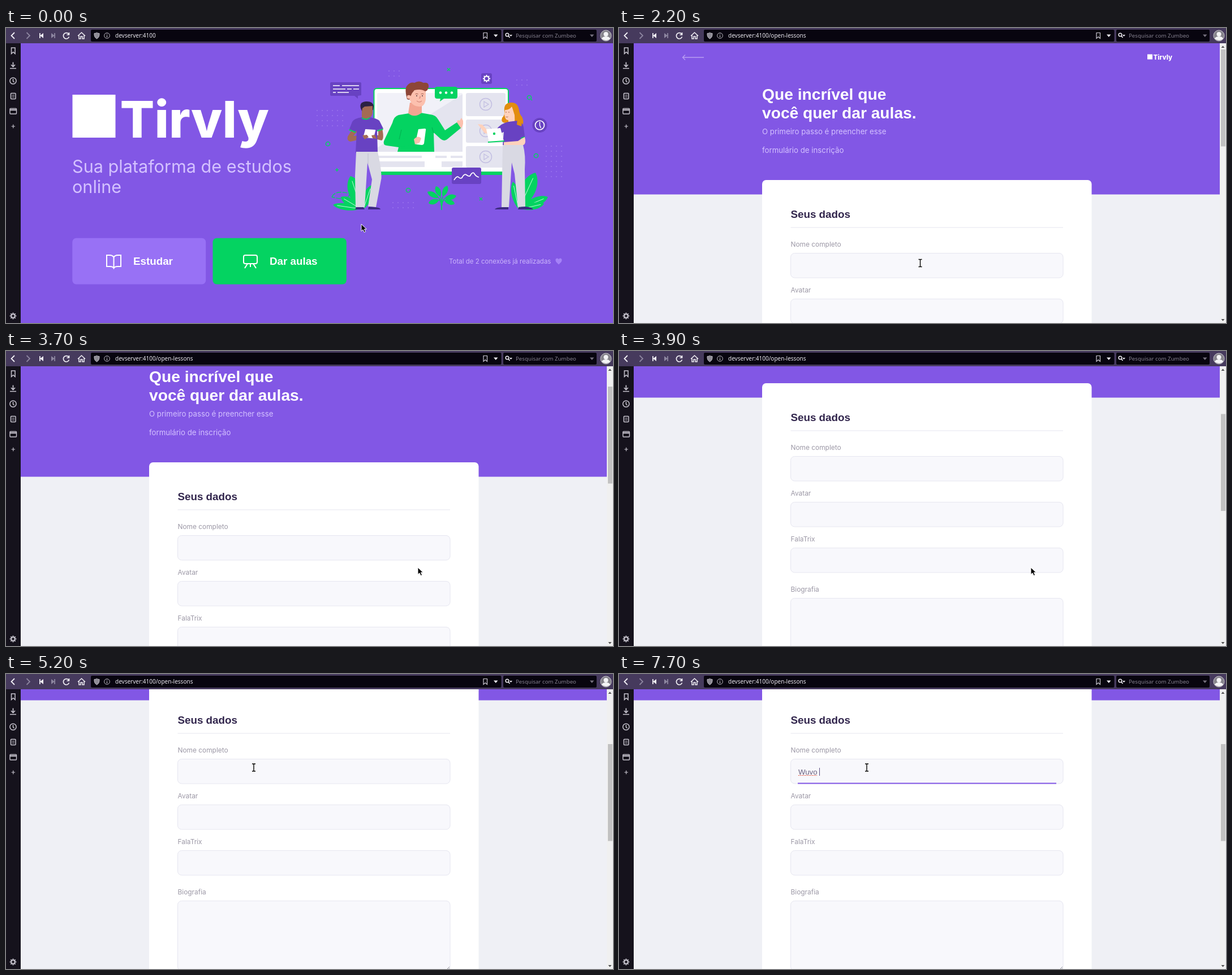
Recreate the animation shown at these times as an HTML page with a canvas. Size 1073x522 px, loop 8000 ms.

```html
<!DOCTYPE html>
<html lang="pt">
<head>
<meta charset="utf-8">
<title>Plataforma de estudos</title>
<style>
html, body { margin: 0; width: 100%; height: 100%; overflow: hidden; background: #8257e5; }
canvas { display: block; }
</style>
</head>
<body>
<canvas id="stage" width="1073" height="522"></canvas>
<script>
const g = document.getElementById('stage').getContext('2d');
const LOOP = 8000;
const PURPLE = '#8257e5', DEEP = '#6842c2', GREEN = '#04d361', LILAC = '#d4c2ff', PALE = '#e6e6f0';
const BRAND = 'Tirvly', ADDRESS = 'devserver:4100', ROUTE = '/open-lessons';
const SANS = 'Inter, sans-serif', HEAD = '"Liberation Sans", Arial, sans-serif', UI = '"Noto Sans", sans-serif';

const clamp = v => Math.max(0, Math.min(1, v));
const mix = (a, b, p) => a + (b - a) * p;
const smooth = p => p * p * (3 - 2 * p);

function paint(shape, fill, stroke, width = 1) {
  if (fill) { g.fillStyle = fill; g.fill(shape); }
  if (stroke) { g.strokeStyle = stroke; g.lineWidth = width; g.stroke(shape); }
}
function path(d, fill, stroke, width) { paint(new Path2D(d), fill, stroke, width); }
function line(d, color, width = 1.5) { path(d, null, color, width); }
function box(x, y, w, h, fill, r = 0, stroke, width) {
  const p = new Path2D();
  p.roundRect(x, y, w, h, r);
  paint(p, fill, stroke, width);
}
function circle(x, y, r, fill, stroke, width) {
  const p = new Path2D();
  p.arc(x, y, r, 0, Math.PI * 2);
  paint(p, fill, stroke, width);
}
function text(s, x, y, font, color) {
  g.font = font;
  g.fillStyle = color;
  g.fillText(s, x, y);
}
function dots(x, y, cols, rows, step) {
  for (let i = 0; i < cols * rows; i++)
    circle(x + i % cols * step, y + Math.floor(i / cols) * step, 0.8, '#a98bf2');
}
function leaf(x0, y0, x1, y1, w, vein = true) {
  const len = Math.hypot(x1 - x0, y1 - y0);
  g.save();
  g.translate(x0, y0);
  g.rotate(Math.atan2(y1 - y0, x1 - x0));
  path(`M0 0 C${len * .3} ${-w} ${len * .8} ${-w} ${len} 0 C${len * .8} ${w} ${len * .3} ${w} 0 0`, GREEN);
  if (vein) line(`M0 0H${len * .85}`, '#d9ffe8', 0.8);
  g.restore();
}
function gear(x, y, r, color, width) {
  for (let i = 0; i < 8; i++) {
    const a = i * Math.PI / 4, cx = Math.cos(a), cy = Math.sin(a);
    line(`M${x + cx * r} ${y + cy * r}L${x + cx * (r + 2)} ${y + cy * (r + 2)}`, color, width);
  }
  circle(x, y, r - 0.6, null, color, width);
}
function logo(x, y, side, size, gap) {
  box(x, y - side, side, side, '#fff');
  text(BRAND, x + side + gap, y, `800 ${size}px ${SANS}`, '#fff');
}

// Browser frame

function chrome(route) {
  box(0, 0, 1073, 27, '#463a5d');
  box(0, 27, 26, 495, '#15121c');
  const on = '#f1eff5', off = '#8d86a0';
  line('M15 8L9.5 13.5L15 19', on, 1.8);
  line('M36.5 8L42 13.5L36.5 19', off, 1.8);
  path('M59 9h1.8v4l5.2-4v9l-5.2-4v4h-1.8z', on);
  path('M87 9h-1.8v4l-5.2-4v9l5.2-4v4h1.8z', off);
  line('M111 11A5.2 5.2 0 1 0 111.5 15.5M111.5 8v4h-4', on, 1.7);
  line('M127 14L133.5 8L140 14M129 13v6h3v-4h3v4h3v-6', on, 1.5);

  box(150, 3, 725.5, 21, '#08050f', 2);
  path('M156 9.5q4 0 4.5-1.5q.5 1.5 4.5 1.5q.5 7-4.5 9.5q-5-2.5-4.5-9.5z', '#8e8b95', '#c2bfc8');
  circle(178.5, 13.5, 4.8, null, '#c5c2cb', 1);
  line('M178.5 13v3.5M178.5 10.5v1.2', '#c5c2cb', 1.2);
  text(ADDRESS + route, 193, 17.3, `10px ${UI}`, '#e9e7ee');
  line('M844 8.5h6.5v10l-3.25-3l-3.25 3z', '#cfccd5', 1.2);
  path('M862 11.5h7.5l-3.75 4.5z', on);

  box(879, 3, 165, 21, '#08050f', 2);
  circle(886, 12, 2.8, null, on, 1.5);
  line('M888 14l2.5 3', on, 1.7);
  path('M890 12h5l-2.5 3z', on);
  text('Pesquisar com Zumbeo', 901, 17.3, `9.7px ${UI}`, '#85818f');
  path('M1032 11.5h7.5l-3.75 4.5z', '#77717f');
  circle(1060.5, 13.5, 9.5, '#85838b', '#c9c6ce', 1);
  circle(1060.5, 11, 4, '#f4f4f6');
  path('M1053 19q1-4 7.5-4t7.5 4q-7 6-15 0z', '#f4f4f6');

  const ink = '#c9c6d0';
  line('M9.5 35h6.5v10.5l-3.25-3l-3.25 3z', ink);
  line('M12.5 60.5v7M9 65l3.5 3.5l3.5-3.5M7 71.5h11', ink, 1.7);
  circle(12.5, 93.5, 5.6, null, ink, 1.5);
  line('M12.5 90v4l2 2', ink);
  box(8.5, 115.5, 8.5, 10, null, 1, ink, 1.5);
  line('M10.5 119h4.5M10.5 122h4.5', ink, 1.2);
  box(7, 142.5, 11.5, 9.5, null, 1, ink, 1.4);
  line('M7 145h11', ink, 2);
  line('M9.5 174h6.5M12.75 170.7v6.6', ink, 1.2);
  gear(12.5, 509.5, 3.8, ink, 2);
}

// Home page

function board() {
  box(649.5, 106, 239.5, 154, GREEN, 6);
  box(651.5, 108, 235.5, 146, '#fff', 4);
  box(656, 115, 151, 104, '#f1f1f8', 2);
  path('M807 117V219H656V212z', '#e4e4ef');
  for (const [x, y, w, h] of [[656, 226, 79, 4], [759, 226, 20, 4], [786, 226, 21, 4], [656, 236, 84, 10], [770, 236, 37, 10]])
    box(x, y, w, h, '#e4e4ef');
  for (const [y, cy] of [[115, 135], [162, 182], [209, 228]]) {
    box(813, y, 70, y === 209 ? 38 : 41, '#e4e4ef', 3);
    circle(848, cy, 10.5, null, '#c3bfe2', 1.5);
    path(`M845 ${cy - 5}l8 5l-8 5z`, null, '#c3bfe2', 1.3);
  }
}
function teacher() {
  const skin = '#fcc0ae';
  path('M797 169Q797 161 802 164L805 159L808 164Q809 174 803 179z', skin);
  path('M712 151L694 154Q686 156 683 168L668 200Q666 207 673 208L694 211L692 219H757L756 185L768 196Q775 202 781 196L804 177L797 167L776 181L764 162Q760 154 750 153L733 150z', GREEN);
  path('M694 211L726 205L724 193L695 196z', GREEN);
  line('M699 180L695 197M756 186L753 176', '#03b653', 1.2);
  path('M714 132L735 132V150Q722 160 711 151z', '#f2a592');
  path('M711 113Q712 105 728 105L742 109V126Q740 140 730 139Q716 138 713 124z', skin);
  path('M709 126Q704 107 709 102Q715 95 722 97Q730 92 738 97Q748 95 747 104Q746 111 741 112Q734 107 722 110Q717 115 715 121L713 127z', '#8d4637');
  circle(712, 122, 3.3, skin);
  for (const x of [726, 736]) {
    circle(x, 120, 0.9, '#3a2530');
    line(`M${x - 2.5} 117q2.500-1.500 5 0`, '#8d4637', 0.8);
  }
  line('M732 120v4h-2M726 129q5 4 9 0', '#c9756a', 1);
  path('M729 179L740 178Q743 178 742 181L739 204Q738 207 735 207L726 206Q723 205 724 202z', '#fff');
  path('M721 197Q728 189 734 195L731 203L723 206z', skin);
}
function student() {
  const skin = '#a46b54';
  path('M627 142Q624 131 636 130Q648 129 650 138L649 145L630 149z', '#2b2144');
  path('M630 142L634 139L648 138V150Q646 160 639 159L643 163H629V148z', skin);
  path('M613 178L604 192Q602 200 609 201L635 195L632 189L614 191L622 182zM658 181L665 178Q669 196 664 199L648 195V188L658 190z', skin);
  path('M629 158Q615 160 612 166L607 179L618 184L620 181L618 221H657L656 181L667 178L660 164Q656 160 643 158Q638 164 629 158z', DEEP);
  line('M606.5 180L618 184.5M656 182L666.5 179M629 159q7 5 14 0', GREEN, 2);
  path('M635 180Q634 179 636 179L652 180Q654 180 653 182L650 194Q649 196 647 195L633 194Q631 194 632 191z', '#fff');
  path('M630 190L638 189L641 193L634 197zM646 190L652 189L655 196L648 195z', skin);
  path('M619 219H657Q664 250 663.5 266L654 317L640 316L647 268L639 238L634 317H618L617 262z', '#d9d9e3');
  line('M640 222V241', '#bebed0', 1);
  path('M619 317H632L634 321H617zM641 316L653 317Q662 318 662 321H640z', '#3d2a82');
}
function reader() {
  const skin = '#ffd2bc', hair = '#e28d10';
  path('M881 148Q879 132 893 132Q905 131 907 146Q908 153 912 157Q918 170 909 176L897 172L884 168Q874 168 877 159Q882 154 881 148z', hair);
  path('M882 145Q890 145 894 139L900 148L899 168L888 169V163Q882 163 881 153z', skin);
  path('M894 138Q904 139 905 151Q914 164 908 172Q899 168 899 154z', hair);
  line('M883 149h2M888 149h2M883.5 157q2 1.500 4 0', '#a05a45', 0.9);
  path('M868 178L850 180L842 171L834 170L846 186L866 190L873 186z', skin);
  path('M888 166L904 164Q914 167 915 176L917 192L910 196V208H878L880 184L872 187L866 180Q876 168 888 166z', DEEP);
  path('M904 160Q914 164 911 174L903 171z', hair);
  line('M910 195.5L917 192.5M866 180L872 186.5', GREEN, 1.5);
  path('M911 196L917 193Q920 204 915 207L880 208V202L905 200z', skin);
  path('M849 179L874 177L880 200L854 203z', '#fff');
  line('M852 202L881 200', GREEN, 1.8);
  circle(863, 187, 2.2, GREEN);
  path('M878 207H914Q919 225 917 250L918 316L905 317L899 258L894 238L889 317H876L877 260z', '#d9d9e3');
  path('M880 317H888V321H864Q866 317 880 317zM906 317L918 316Q930 317 932 321H905z', '#3d2a82');
}
function ornaments() {
  for (const d of [[677, 76, 3, 2, 9], [550, 146, 6, 4, 9], [903, 92, 3, 2, 9], [955, 209, 4, 7, 9], [684, 309, 5, 2, 9]]) dots(...d);
  for (const [x, y] of [[569, 205], [925, 123], [937, 226], [711, 287]]) circle(x, y, 3.6, null, GREEN, 1.5);
  line('M780 71l5 5m0-5l-5 5M837 300l5 5m0-5l-5 5M582 251h6m-3-3v6M928 126l2 2', GREEN);
  path('M575 96H626Q628 96 628 98V119L622 120V125L616 120H575Q573 120 573 118V98Q573 96 575 96z', DEEP);
  line('M578 102h12m4 0h30M578 108h22m3 0h8m3 0h10M578 114h5m3 0h20', '#fff', 1.6);
  box(840, 80, 19, 19, DEEP, 3);
  gear(849.5, 89.5, 4.6, '#fff', 2);
  circle(943.5, 172, 13, DEEP);
  circle(943.5, 172, 8, null, '#fff', 1.7);
  line('M943.5 166v6l2 5', '#fff');
}
function plants() {
  for (const p of [[628, 320, 609, 262, 17], [632, 320, 646, 278, 10], [627, 320, 592, 299, 10], [626, 320, 578, 313, 8],
    [907, 320, 936, 256, 18], [908, 320, 958, 299, 11], [906, 320, 896, 272, 9], [912, 320, 951, 311, 8]]) leaf(...p);
  g.setLineDash([9, 2]);
  line('M576 299Q582 286 608 293Q604 307 576 299', GREEN, 1.4);
  g.setLineDash([]);
  for (const [x, y] of [[745, 290], [760, 280], [780, 279], [796, 297], [747, 310], [793, 311]]) {
    const bx = mix(770, x, 0.2), by = mix(303, y, 0.2);
    line(`M770 322Q770 306 ${bx} ${by}`, GREEN, 1.5);
    leaf(bx, by, x, y, 6, false);
  }
}
function home(hover) {
  box(26, 27, 1047, 495, PURPLE);
  logo(117.5, 194, 76, 90, 8);
  const big = `30.6px ${SANS}`;
  text('Sua plataforma de estudos', 117, 256, big, LILAC);
  text('online', 117, 292, big, LILAC);
  ornaments();
  plants();
  board();
  teacher();
  path('M762 104H794Q798 104 798 108V121Q798 125 794 125H774L767 130L768 125H762Q758 125 758 121V108Q758 104 762 104z', GREEN);
  for (const x of [768, 778, 788]) circle(x, 114.5, 2.2, '#fff');
  box(788, 247, 52, 29, DEEP, 3);
  line('M792 269Q797 261 800 264T806 265Q810 257 814 260T820 262Q825 253 828 258T836 264', '#fff', 1.7);
  student();
  reader();

  box(117.3, 371.7, 235.9, 81.9, '#9871f5', 7);
  box(365.5, 371.7, 236.3, 81.9, `rgb(4,${mix(211, 191, hover)},${mix(97, 88, hover)})`, 7);
  const bold = `bold 18.8px ${HEAD}`;
  line('M190.5 406Q189 402 183 402H178V422H184Q189 422 190.5 425Q192 422 197 422H203V402H198Q192 402 190.5 406V424', '#fff', 2);
  text('Estudar', 225, 419, bold, '#fff');
  box(420, 402, 24, 15, null, 3, '#fff', 2);
  line('M427 417L422 425M437 417L442 425M432 417V423', '#fff', 2);
  text('Dar aulas', 466, 419, bold, '#fff');
  text('Total de 2 conexões já realizadas', 783, 416.5, `11.5px ${SANS}`, '#cbb6fb');
  path('M977 418.5L972.5 414Q970 409.5 973 407.7Q976 406.7 977 409.5Q978 406.7 981 407.7Q984 409.5 981.5 414z', '#a582f7');
}

// Form page, positions given unscrolled

const FIELDS = [
  { label: 'Nome completo', y: 399, h: 43, base: 387 },
  { label: 'Avatar', y: 480, h: 43, base: 468 },
  { label: 'FalaTrix', y: 561, h: 43, base: 549 },
  { label: 'Biografia', y: 650, h: 123, base: 638 }
];
function form(scroll) {
  g.save();
  g.beginPath();
  g.rect(26, 27, 1047, 495);
  g.clip();
  box(26, 27, 1036, 495, '#eff0f5');
  g.translate(0, -scroll);
  box(26, 27, 1036, 267.5, PURPLE);
  line('M150 52H112.5M117 47.5L112.5 52L117 56.5', '#b99df2', 1.3);
  logo(934, 55.5, 9, 11.5, 1.5);
  const title = `bold 28.2px ${HEAD}`, lead = `13.25px ${SANS}`;
  text('Que incrível que', 253, 126.5, title, '#fff');
  text('você quer dar aulas.', 253, 159.5, title, '#fff');
  text('O primeiro passo é preencher esse', 253, 187.5, lead, LILAC);
  text('formulário de inscrição', 253, 220.5, lead, LILAC);
  box(253, 269, 582.5, 700, '#fff', 7);
  text('Seus dados', 303.5, 336, `bold 18.8px ${HEAD}`, '#32264d');
  box(303.5, 352.5, 481.5, 1, PALE);
  for (const f of FIELDS) {
    text(f.label, 303.5, f.base, `11.9px ${SANS}`, '#9c98a6');
    box(303.5, f.y - 0.5, 481.5, f.h + 0.5, '#f8f8fc', 7, PALE);
  }
  line('M779 771l5-5M782 771l2-2', '#8a8a92', 1);
  g.restore();

  box(1062, 27, 11, 495, '#f0f0f0');
  box(1064, 38 + scroll * 0.347, 8, 171.5, '#c1c1c1');
  path('M1064.5 35h6l-3-3.5z', '#505050');
  path('M1064.5 515h6l-3 3.5z', '#505050');
}
function typing(t) {
  const name = 'Wuvo ';
  const count = [6400, 6800, 6900, 7400, 7700].filter(at => t >= at).length;
  const font = `13.2px ${HEAD}`, ink = '#6a6180';
  box(316, 192.5, 457, 2, PURPLE);
  text(name.slice(0, count), 317, 178, font, ink);
  if (count === name.length) {
    g.setLineDash([2, 1]);
    line(`M317 179.5H${317 + g.measureText(name.trim()).width}`, '#e2553f', 1);
    g.setLineDash([]);
  }
  const end = Math.round(317 + g.measureText(name.slice(0, count)).width);
  if (t < 6200 || t >= 6400) box(end, 166, 1, 14, '#5a4d80');
  if (t < 6400) {
    box(302.5, 195.5, 152, 71, '#fff', 0, '#c8c8cc');
    ['Wuvo Tarnel', 'Wuvo', 'Teste'].forEach((s, i) => text(s, 309, 212 + i * 23, `11px ${UI}`, '#3c3c40'));
  }
}

// Pointer

function arrow(x, y) {
  path(`M${x} ${y}v12.5l3-2.7l2.2 4.7l2.4-1.1l-2.2-4.5h4z`, '#000', '#fff', 1);
}
function hand(x, y) {
  path(`M${x - 1} ${y}q1.5-.8 2.2 .6v4l6 1.5q1.3 .6 1 2.5l-1 5.5h-6l-4-5q-.6-1.8 1.8-1z`, '#fff', '#000', 1);
  line(`M${x + 3} ${y + 9}v3m2-3v3`, '#000', 0.8);
}
function beam(x, y) {
  const d = `M${x - 3} ${y - 6.5}h2.2l.8 .8l.8-.8h2.2M${x} ${y - 6}v12M${x - 3} ${y + 6.5}h2.2l.8-.8l.8 .8h2.2`;
  line(d, '#fff', 3.2);
  line(d, '#000', 1.4);
}
function pointer(t) {
  // Moves advance once per 100 ms, the first step landing on the start time.
  const part = (from, steps) => smooth(clamp((t - from + 100) / (steps * 100)));
  if (t < 2200) {
    const p = part(800, 6), q = 1 - p;
    return [628 * q * q + 2 * p * q * 640 + 534 * p * p, 347 * q * q + 2 * p * q * 377 + 415 * p * p];
  }
  if (t >= 5200) return [438, 165.5];
  if (t >= 4400) { const p = part(4400, 6); return [mix(728, 470, p), mix(383, 198, p)]; }
  const p = part(3100, 4);
  return [mix(532.5, 728, p), mix(416, 383, p)];
}
function drawPointer(t, scroll) {
  const [x, y] = pointer(t);
  if (t < 2200) return (x < 601 && y > 372 ? hand : arrow)(x, y);
  const scrolling = t >= 3700 && t < 4400;
  const over = FIELDS.some(f => y + scroll > f.y && y + scroll < f.y + f.h);
  (over && !scrolling ? beam : arrow)(x, y);
}
function scrollAt(t) {
  const stops = [0, 72, 146, 212, 236, 246, 248];
  return stops[Math.max(0, Math.min(6, Math.floor((t - 3600) / 100)))];
}

function frame() {
  const t = Math.floor(performance.now() % LOOP / 100) * 100;
  const scroll = scrollAt(t);
  g.clearRect(0, 0, 1073, 522);
  if (t < 2200) home(clamp((t - 900) / 300));
  else form(scroll);
  if (t >= 5500) typing(t);
  chrome(t < 2200 ? '' : ROUTE);
  drawPointer(t, scroll);
  requestAnimationFrame(frame);
}
frame();
</script>
</body>
</html>
```
